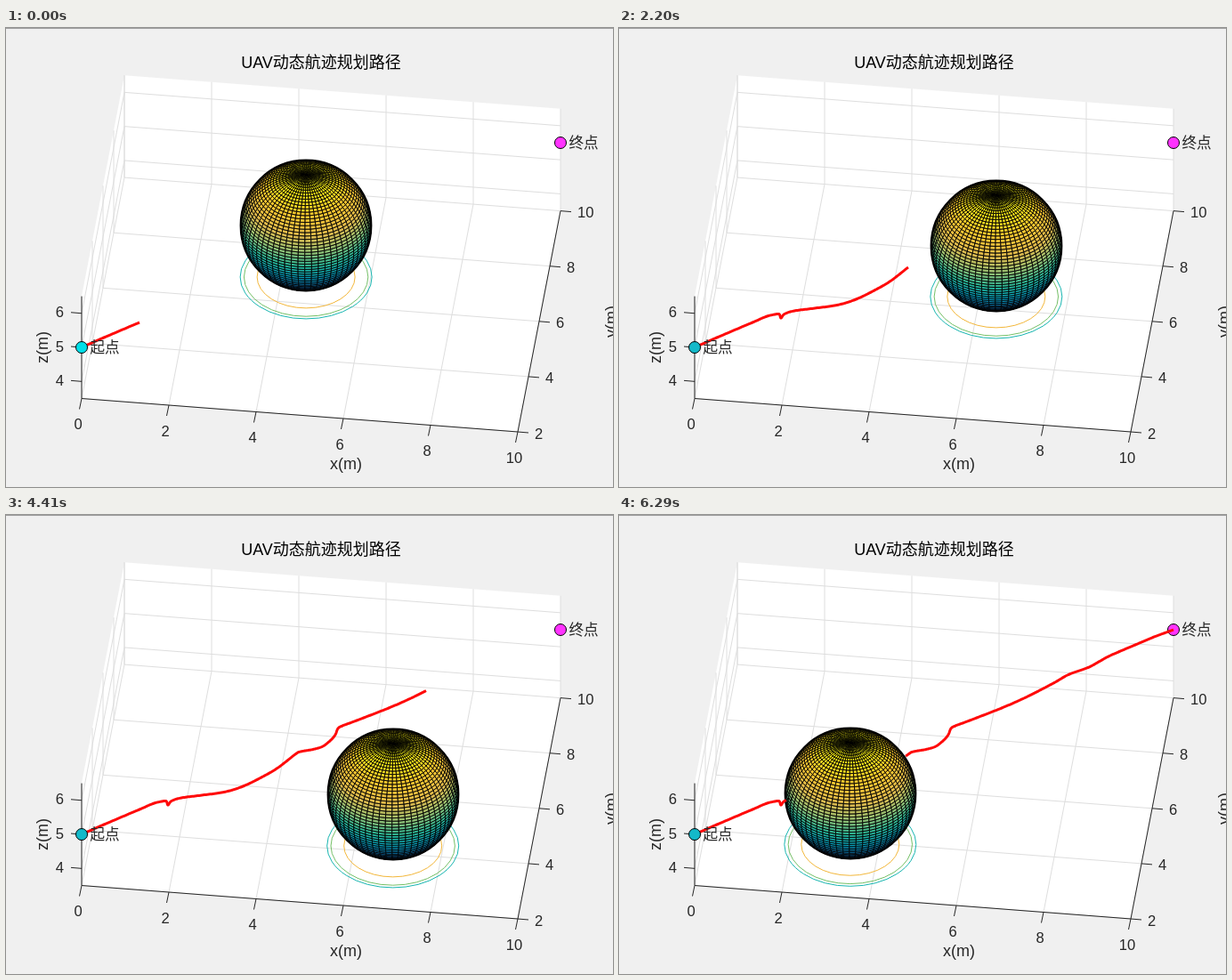
An HTML page with a canvas that plays this animation: 682 px wide and 516 px high, repeating every 6.69 s.

```html
<!DOCTYPE html>
<html lang="zh">
<head>
<meta charset="utf-8">
<style>
  html, body { margin: 0; overflow: hidden; background: #f0f0f0; }
  canvas { display: block; }
</style>
</head>
<body>
<canvas id="stage" width="682" height="516"></canvas>
<script>
const ctx = document.getElementById('stage').getContext('2d');
const LOOP = 6690, STEP = 78.6, LAST = 80;
const Z0 = 3.5, Z1 = 6.5, R = 1.5, UNIT = 49.4;
const FONT = '"Liberation Sans", Arial, "Noto Sans CJK SC", "Noto Sans CJK", sans-serif';
const INK = '#262626';

// [step, value] knots
const ORBIT = [[0, 103.3], [9, 200.5], [13, 246.2], [27, 400], [28, 406.8], [36, 493], [45, 584.4],
  [54, 682], [56, 698.4], [63, 774.5], [70, 842], [72, 865], [80, 933.7]];
const TIP = [[0, 150], [13, 211.5], [28, 325], [45, 394], [56, 472], [70, 552], [72, 563], [80, 623]];

const ROUTE = [[85, 359], [110, 348], [150, 331], [165, 324.5], [175, 322], [180, 321.7], [182, 326],
  [186, 321.5], [197, 318], [220, 315], [245, 311.5], [265, 305.5], [285, 296], [305, 284.5], [325, 269],
  [331, 266], [345, 263.5], [356, 260], [365, 253], [370, 247], [373, 240], [378, 237], [394, 231],
  [430, 217], [455, 206], [472, 197.5], [490, 188], [505, 179.5], [527, 171.5], [540, 164.5],
  [552, 158], [580, 146], [600, 137.5], [623, 129]];

const PARULA = [[53, 42, 135], [3, 99, 225], [20, 133, 212], [6, 167, 198], [40, 185, 153],
  [146, 191, 115], [225, 186, 76], [252, 200, 46], [249, 251, 14]];

function lerpKnots(knots, k) {
  let i = 1;
  while (i < knots.length - 1 && knots[i][0] < k) i++;
  const [a, va] = knots[i - 1], [b, vb] = knots[i];
  return va + (vb - va) * (k - a) / (b - a);
}

function parula(f) {
  const i = Math.min(7, Math.floor(f * 8)), t = f * 8 - i;
  return `rgb(${PARULA[i].map((c, j) => Math.round(c + (PARULA[i + 1][j] - c) * t))})`;
}

// Smooth the route and lift it from screen to axes coordinates
function buildRoute() {
  const out = [], at = i => ROUTE[Math.max(0, Math.min(ROUTE.length - 1, i))];
  for (let i = 0; i < ROUTE.length - 1; i++) {
    for (let t = 0; t < 1; t += 0.0625) {
      const [px, py] = [0, 1].map(j => {
        const [a, b, c, d] = [-1, 0, 1, 2].map(n => at(i + n)[j]);
        return b + t * (c - a + t * (2 * a - 5 * b + 4 * c - d + t * (3 * b - a - 3 * c + d))) / 2;
      });
      const v = (359.05 - py + 0.03745 * (px - 85)) / 31.275;
      const x = (px - 85 - 6 * v) / 49;
      out.push({ px, x, y: 2 + v, z: 5 + 0.05 * x });
    }
  }
  out.push({ px: 623, x: 10, y: 10, z: 5.5 });
  return out;
}

const depth = (x, y, z) => 0.094 * x - 0.77 * y + 0.63 * z;

function buildSphere() {
  const c = document.createElement('canvas');
  c.width = c.height = 160;
  const g = c.getContext('2d'), n = 60, r = R * UNIT - 0.7;
  g.translate(80, 80);
  const point = (i, j) => {
    const lat = (i / n - 0.5) * Math.PI, lon = j / n * 2 * Math.PI;
    return [Math.cos(lat) * Math.cos(lon), Math.cos(lat) * Math.sin(lon), Math.sin(lat)];
  };
  g.lineWidth = 0.9;
  for (let i = 0; i < n; i++) {
    g.fillStyle = parula((Math.sin(((i + 0.5) / n - 0.5) * Math.PI) + 1) / 2);
    for (let j = 0; j < n; j++) {
      if (depth(...point(i + 0.5, j + 0.5)) < 0) continue;
      g.beginPath();
      for (const [di, dj] of [[0, 0], [0, 1], [1, 1], [1, 0]]) {
        const [x, y, z] = point(i + di, j + dj);
        g.lineTo(r * (0.992 * x + 0.1215 * y), r * (0.076 * x - 0.629 * y - 0.775 * z));
      }
      g.closePath();
      g.fill();
      g.stroke();
    }
  }
  g.lineWidth = 2;
  g.beginPath();
  g.arc(0, 0, r, 0, 7);
  g.stroke();
  return c;
}

const route = buildRoute(), sphere = buildSphere();
let shift = 0;

function project(x, y, z) {
  return [85 + 49 * x + 6 * (y - 2) + shift * 2 * (1 - x / 10),
    416.5 + 3.75 * x - 31.05 * (y - 2) - 38.3 * (z - Z0) - 5.2 * shift];
}

function line(points, color, width = 1) {
  ctx.strokeStyle = color;
  ctx.lineWidth = width;
  ctx.beginPath();
  points.forEach(p => ctx.lineTo(...p));
  ctx.stroke();
}

function text(str, x, y, size, align = 'center', turn = 0, color = INK) {
  ctx.save();
  ctx.translate(x, y);
  ctx.rotate(turn);
  ctx.font = `${size}px ${FONT}`;
  ctx.textAlign = align;
  ctx.textBaseline = 'middle';
  ctx.fillStyle = color;
  ctx.fillText(str, 0, 0);
  ctx.restore();
}

function tick([x, y], dx, dy, label, lx, ly, align) {
  line([[x, y], [x + dx, y + dy]], INK);
  text(label, x + lx, y + ly, 16.6, align);
}

function drawAxes(yMin) {
  const P = project, grid = '#dedede';
  ctx.fillStyle = '#fff';
  ctx.beginPath();
  [[0, yMin, Z0], [10, yMin, Z0], [10, 10, Z0], [10, 10, Z1], [0, 10, Z1], [0, yMin, Z1]]
    .forEach(p => ctx.lineTo(...P(...p)));
  ctx.fill();

  for (let x = 0; x <= 10; x += 2) line([P(x, yMin, Z0), P(x, 10, Z0), P(x, 10, Z1)], grid);
  for (let y = 2; y <= 10; y += 2) line([P(10, y, Z0), P(0, y, Z0), P(0, y, Z1)], grid);
  for (let z = 4; z <= 6; z++) line([P(0, yMin, z), P(0, 10, z), P(10, 10, z)], grid);
  line([P(0, yMin, Z1), P(0, yMin, Z0), P(10, yMin, Z0), P(10, 10, Z0)], INK);

  for (let x = 0; x <= 10; x += 2) tick(P(x, yMin, Z0), -2.5, 12, x, -4, 30, 'center');
  for (let y = 2; y <= 10; y += 2) tick(P(10, y, Z0), 12, 1, y, 19, 3, 'left');
  for (let z = 4; z <= 6; z++) tick(P(0, yMin, z), -12, -1, z, -20, 0, 'right');

  text('x(m)', 382 - shift, 491 + 5 * shift, 18);
  text('y(m)', 681.5, 330, 18, 'center', -Math.PI / 2);
  text('z(m)', 42 - shift, 359 + 5 * shift, 18, 'center', -Math.PI / 2);
  text('UAV动态航迹规划路径', 354, 40 - 5 * shift, 18, 'center', 0, '#000');
}

function marker([x, y], color, label) {
  ctx.fillStyle = color;
  ctx.strokeStyle = '#000';
  ctx.lineWidth = 1;
  ctx.beginPath();
  ctx.arc(x, y, 6.5, 0, 7);
  ctx.fill();
  ctx.stroke();
  text(label, x + 9.5, y + 1, 16.6, 'left');
}

function drawContours(cx, cy) {
  const [x, y] = project(cx, cy, Z0);
  ctx.lineWidth = 1;
  [[74, '#16b5b0'], [69.7, '#74bf66'], [55, '#f3b73a']].forEach(([r, color]) => {
    ctx.strokeStyle = color;
    ctx.beginPath();
    ctx.ellipse(x, y, r, r * 0.635, 0, 0, 7);
    ctx.stroke();
  });
}

// Draw the part of the flown route that lies behind or before the ball
function drawRoute(tip, cx, cy, behind) {
  const [sx, sy] = project(cx, cy, 5);
  ctx.strokeStyle = '#ff0a0a';
  ctx.lineWidth = 3;
  ctx.lineJoin = 'round';
  ctx.beginPath();
  let pen = false;
  for (const p of route) {
    if (p.px > tip) break;
    const [x, y] = project(p.x, p.y, p.z);
    const gap = R * R - ((x - sx) ** 2 + (y - sy) ** 2) / UNIT ** 2;
    const hidden = gap > 0 && depth(p.x - cx, p.y - cy, p.z - 5) < Math.sqrt(gap);
    if (hidden === behind) pen ? ctx.lineTo(x, y) : ctx.moveTo(x, y);
    pen = hidden === behind;
  }
  ctx.stroke();
}

function frame(now) {
  const k = Math.min(LAST, Math.floor((now % LOOP) / STEP + 0.26));
  const angle = lerpKnots(ORBIT, k) * Math.PI / 180;
  const cx = 5 + 2 * Math.cos(angle), cy = 5 + 2 * Math.sin(angle);
  const yMin = Math.min(2, cy - R), tip = lerpKnots(TIP, k);
  shift = (2 - yMin) * 3;

  ctx.fillStyle = '#f0f0f0';
  ctx.fillRect(0, 0, 682, 516);
  ctx.fillStyle = '#a0a0a0';
  ctx.fillRect(0, 0, 682, 1);
  drawAxes(yMin);
  drawContours(cx, cy);
  marker(project(10, 10, 5.5), '#ff33ff', '终点');
  drawRoute(tip, cx, cy, true);
  const [sx, sy] = project(cx, cy, 5);
  ctx.drawImage(sphere, Math.round(sx - 80), Math.round(sy - 80));
  drawRoute(tip, cx, cy, false);
  marker(project(0, 2, 5), k < 10 ? '#00dfe8' : '#13b9c9', '起点');
}

const start = performance.now();
function loop() {
  frame(performance.now() - start);
  requestAnimationFrame(loop);
}
loop();
</script>
</body>
</html>
```
